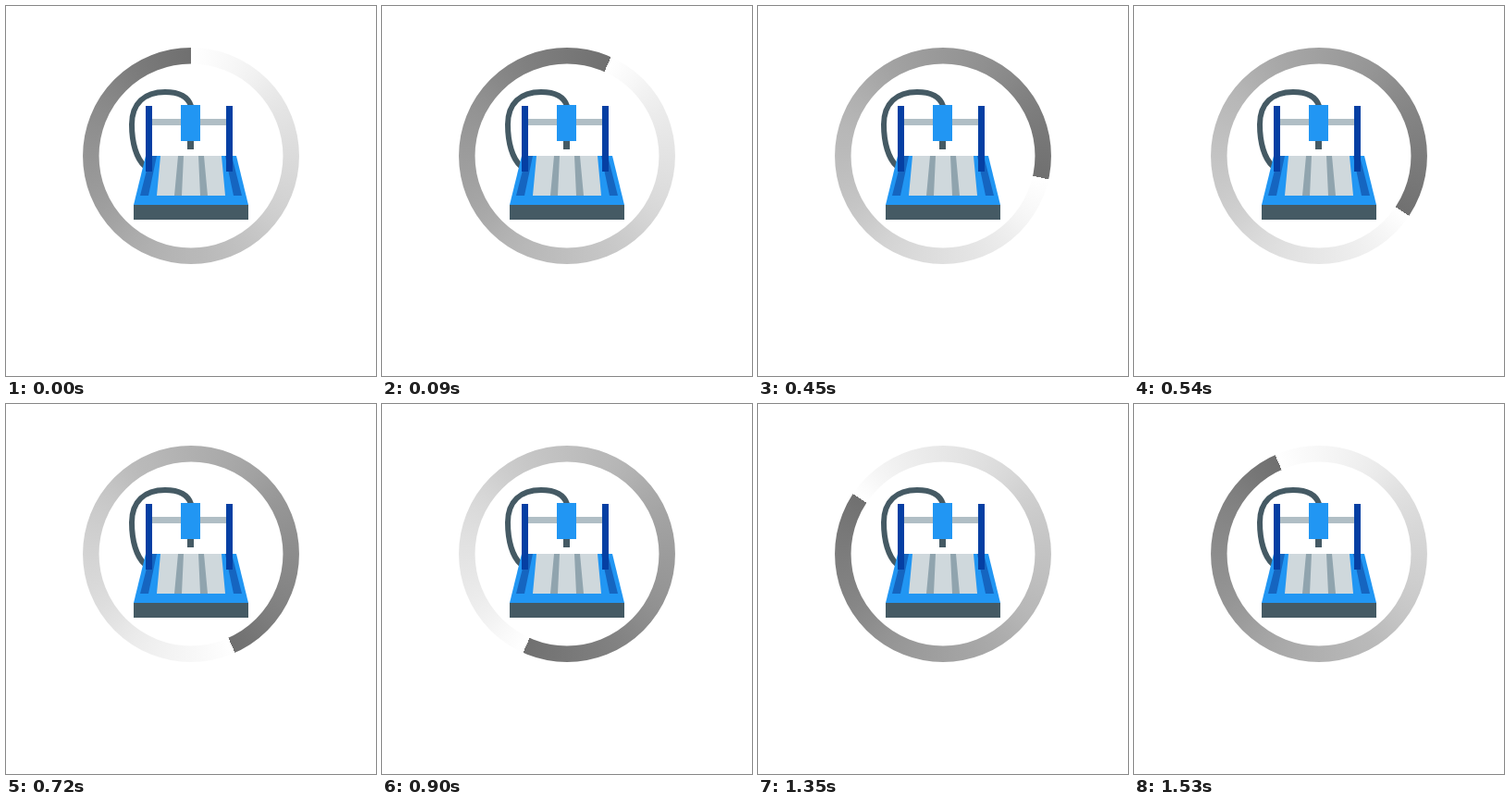
These frames come from a looping animation (400x400 px, 1.62 s). An HTML page with a canvas:

```html
<!DOCTYPE html>
<html lang="en">
<head>
<meta charset="utf-8">
<style>
  html, body { margin: 0; width: 100%; height: 100%; overflow: hidden; background: #fff; }
  canvas, svg { position: absolute; left: 0; top: 0; width: 400px; height: 400px; }
</style>
</head>
<body>
<canvas id="ring" width="400" height="400"></canvas>
<svg viewBox="0 0 400 400">
  <path d="M150 173C141 165 136 148 136 128C136 105 150 93 172 93C188 93 197 99 200 108" fill="none" stroke="#455a64" stroke-width="6"/>
  <path d="M151 162H249L262 215H138Z" fill="#2196f3"/>
  <path d="M138 215H262V231H138Z" fill="#455a64"/>
  <path d="M156 162H163L154 205H145ZM244 162H237L246 205H255Z" fill="#1565c0"/>
  <path d="M167 162H233L237 205H163Z" fill="#cfd8dc"/>
  <path d="M186 162H192L190 205H182ZM214 162H208L210 205H218Z" fill="#90a4ae"/>
  <path d="M158 122H238V129H158Z" fill="#b0bec5"/>
  <path d="M151 108H158V179H151ZM238 108H245V179H238Z" fill="#053fa3"/>
  <path d="M196 145H203V155H196Z" fill="#455a64"/>
  <path d="M189 107H210V146H189Z" fill="#2196f3"/>
</svg>
<script>
const ctx = document.getElementById('ring').getContext('2d');
const CX = 200, CY = 162, STEPS = 18, STEP_MS = 90;
const TURN = Math.PI * 2;

// Maps even progress along a square's perimeter (0..1) to a turn around its centre.
function squareTurn(p) {
  const side = Math.round(p * 4);
  return side / 4 + Math.atan((p * 4 - side) * 2) / TURN;
}

function drawRing(step) {
  const start = squareTurn(step / STEPS);
  const gradient = ctx.createConicGradient(start * TURN - Math.PI / 2, CX, CY);
  for (let i = 0; i <= 72; i++) {
    const k = i / 72;
    const offset = squareTurn(step / STEPS + k) - start;
    const grey = Math.round(255 - 143 * k);
    gradient.addColorStop(Math.min(1, Math.max(0, offset)), `rgb(${grey},${grey},${grey})`);
  }
  ctx.clearRect(0, 0, 400, 400);
  ctx.strokeStyle = gradient;
  ctx.lineWidth = 17.5;
  ctx.beginPath();
  ctx.arc(CX, CY, 108.2, 0, TURN);
  ctx.stroke();
}

function frame(now) {
  drawRing(Math.floor(now / STEP_MS) % STEPS);
  requestAnimationFrame(frame);
}
frame(performance.now());
</script>
</body>
</html>
```
